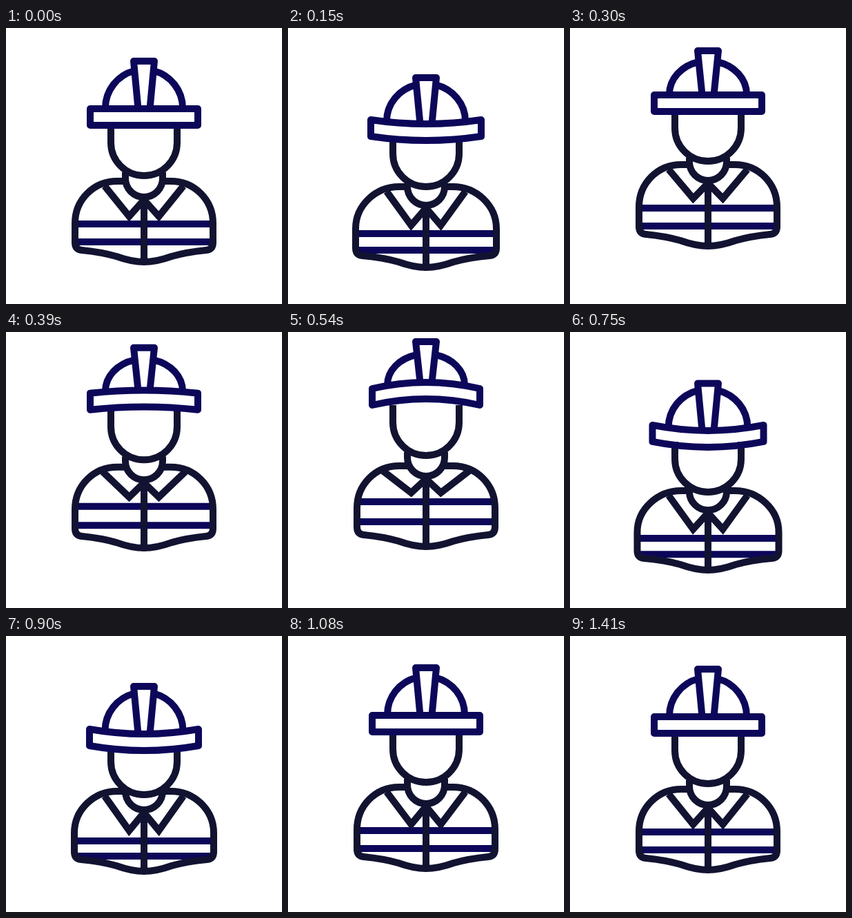
These frames come from a looping animation (400 px wide and 400 px high, 3.44 s). An HTML page with a canvas:

```html
<!DOCTYPE html>
<html lang="en">
<head>
<meta charset="utf-8">
<title>Worker</title>
<style>
  html, body { margin: 0; width: 100%; height: 100%; overflow: hidden; background: #fff; }
  canvas { display: block; width: 100vmin; height: 100vmin; }
</style>
</head>
<body>
<canvas id="stage" width="400" height="400"></canvas>
<script>
const ctx = document.getElementById('stage').getContext('2d');
const LOOP = 3440, STEP = 30;
const DARK = '#121331', BLUE = '#0d075a';
const CX = 200;

// Vertical offsets from the resting pose; bend curves the brim, wide spreads the sides.
const PARTS = ['stem', 'brim', 'bend', 'head', 'shoulder', 'collar', 'tip', 'band1', 'band2', 'hem', 'wide'];
const POSES = [
  [0,      0,   0,  0,   0,   0,   0,   0,   0,   0,   0, 0],
  [150,   24,  16,  6,  16,   8,  12,  13,  14,  12,   8, 2],
  [300,  -15, -20,  0, -21, -24, -24, -26, -23, -23, -23, 0],
  [540,  -34, -35, -9, -35, -28, -36, -40, -38, -35, -28, 0],
  [660,   -2,  -7,  0,  -7,  -9, -10, -12, -10, -10, -10, 0],
  [780,   30,  21,  9,  21,  10,  16,  16,  18,  15,   8, 3],
  [900,   25,  18,  7,  16,   3,   7,   9,  13,   9,   2, 1],
  [1080,  -2,  -2,  0,  -2,  -3,  -2,   0,  -2,  -2,  -2, 0],
  [1230,   2,   2,  0,   2,   2,   2,   1,   2,   2,   2, 0],
  [1410,   0,   0,  0,   0,   0,   0,   0,   0,   0,   0, 0]
];

function slope(i, k) {
  const a = POSES[i - 1], b = POSES[i], c = POSES[i + 1];
  if (!a || !c) return 0;
  const m = (b[k] - a[k]) / (b[0] - a[0]);
  const n = (c[k] - b[k]) / (c[0] - b[0]);
  return m * n <= 0 ? 0 : 2 * m * n / (m + n);
}

// Smooth monotone interpolation between poses.
function poseAt(t) {
  const last = POSES.length - 1;
  t = Math.min(t, POSES[last][0]);
  let i = 0;
  while (i < last - 1 && t > POSES[i + 1][0]) i++;
  const a = POSES[i], b = POSES[i + 1];
  const d = b[0] - a[0], u = (t - a[0]) / d, v = 1 - u;
  const pose = {};
  PARTS.forEach((name, j) => {
    const k = j + 1;
    pose[name] = a[k] * v * v * (1 + 2 * u) + b[k] * u * u * (3 - 2 * u)
      + d * u * v * (slope(i, k) * v - slope(i + 1, k) * u);
  });
  return pose;
}

function stroke(color, build, join = 'round', cap = 'butt') {
  ctx.strokeStyle = color;
  ctx.lineWidth = 10;
  ctx.lineJoin = join;
  ctx.lineCap = cap;
  ctx.beginPath();
  build();
  ctx.stroke();
}

function line(...p) {
  ctx.moveTo(p[0], p[1]);
  for (let i = 2; i < p.length; i += 2) ctx.lineTo(p[i], p[i + 1]);
}

// Runs a drawing for both halves; s is -1 on the left, 1 on the right.
const mirror = draw => [-1, 1].forEach(draw);

function drawBody(p) {
  const half = 100 + p.wide;
  const top = 222 + p.shoulder, hem = 322 + p.hem;
  const side = 283 + (p.shoulder + p.hem) / 2;
  const vee = 249 + p.collar;

  stroke(BLUE, () => {
    for (const y of [284 + p.band1, 310 + p.band2]) line(CX - half, y, CX + half, y);
  });

  mirror(s => {
    const x = d => CX + s * d;
    stroke(DARK, () => {
      ctx.moveTo(x(27), top);
      ctx.lineTo(x(39), top);
      ctx.bezierCurveTo(x(73), top, x(half), top + 27, x(half), side);
      ctx.lineTo(x(half), hem - 11);
      ctx.quadraticCurveTo(x(half), hem - 1, x(half - 10), hem);
      ctx.bezierCurveTo(x(70), hem + 2, x(54), hem + 5, x(40), hem + 9);
      ctx.bezierCurveTo(x(26), hem + 14, x(14), hem + 17, CX, hem + 17);
    });
    const spread = 57 + Math.max(0, -p.bend) * 0.65;
    stroke(DARK, () => line(x(spread), 229 + p.shoulder, x(21.5), 273 + p.tip, CX, vee), 'miter');
  });
  stroke(DARK, () => line(CX, vee, CX, hem + 17), 'round', 'round');
}

function drawHead(p) {
  const neck = 218 + p.collar, chin = 166 + p.head;
  stroke(DARK, () => {
    ctx.moveTo(CX + 27, 209 + p.head);
    ctx.arc(CX, neck, 27, 0, Math.PI);
    ctx.lineTo(CX - 27, 209 + p.head);
  });
  stroke(DARK, () => {
    ctx.moveTo(CX + 48, 141 + p.brim);
    ctx.arc(CX, chin, 48, 0, Math.PI);
    ctx.lineTo(CX - 48, 141 + p.brim);
  });
}

function drawHelmet(p) {
  const half = 78 + p.wide;
  const top = 117 + p.brim, low = top + 24;
  const crown = 62 + p.stem * 0.85, base = top + p.bend * 0.48;

  stroke(BLUE, () => {
    ctx.moveTo(CX - half, top);
    ctx.quadraticCurveTo(CX, top + 2 * p.bend, CX + half, top);
    ctx.lineTo(CX + half, low);
    ctx.quadraticCurveTo(CX, low + 2 * p.bend, CX - half, low);
    ctx.closePath();
  });
  stroke(BLUE, () => {
    const y = top + p.bend;
    line(CX - 8.5, y, CX - 15, 48 + p.stem, CX + 15, 48 + p.stem, CX + 8.5, y);
  });
  mirror(s => stroke(BLUE, () => {
    // Quarter ellipse cut off where it meets the stem.
    const rx = 56 + p.wide / 2, cut = Math.acos(14 / rx);
    const ry = (base - 1 - crown) / Math.sin(cut);
    ctx.moveTo(CX + s * rx, base);
    ctx.ellipse(CX, base - 1, rx, ry, 0,
      s > 0 ? 0 : Math.PI, s > 0 ? -cut : Math.PI + cut, s > 0);
  }));
}

function render(now) {
  const t = Math.floor((now % LOOP) / STEP) * STEP;
  const pose = poseAt(t);
  ctx.fillStyle = '#fff';
  ctx.fillRect(0, 0, 400, 400);
  drawBody(pose);
  drawHead(pose);
  drawHelmet(pose);
}

let start;
function tick(now) {
  start ??= now;
  render(Math.max(0, now - start));
  requestAnimationFrame(tick);
}
render(0);
requestAnimationFrame(tick);
</script>
</body>
</html>
```
